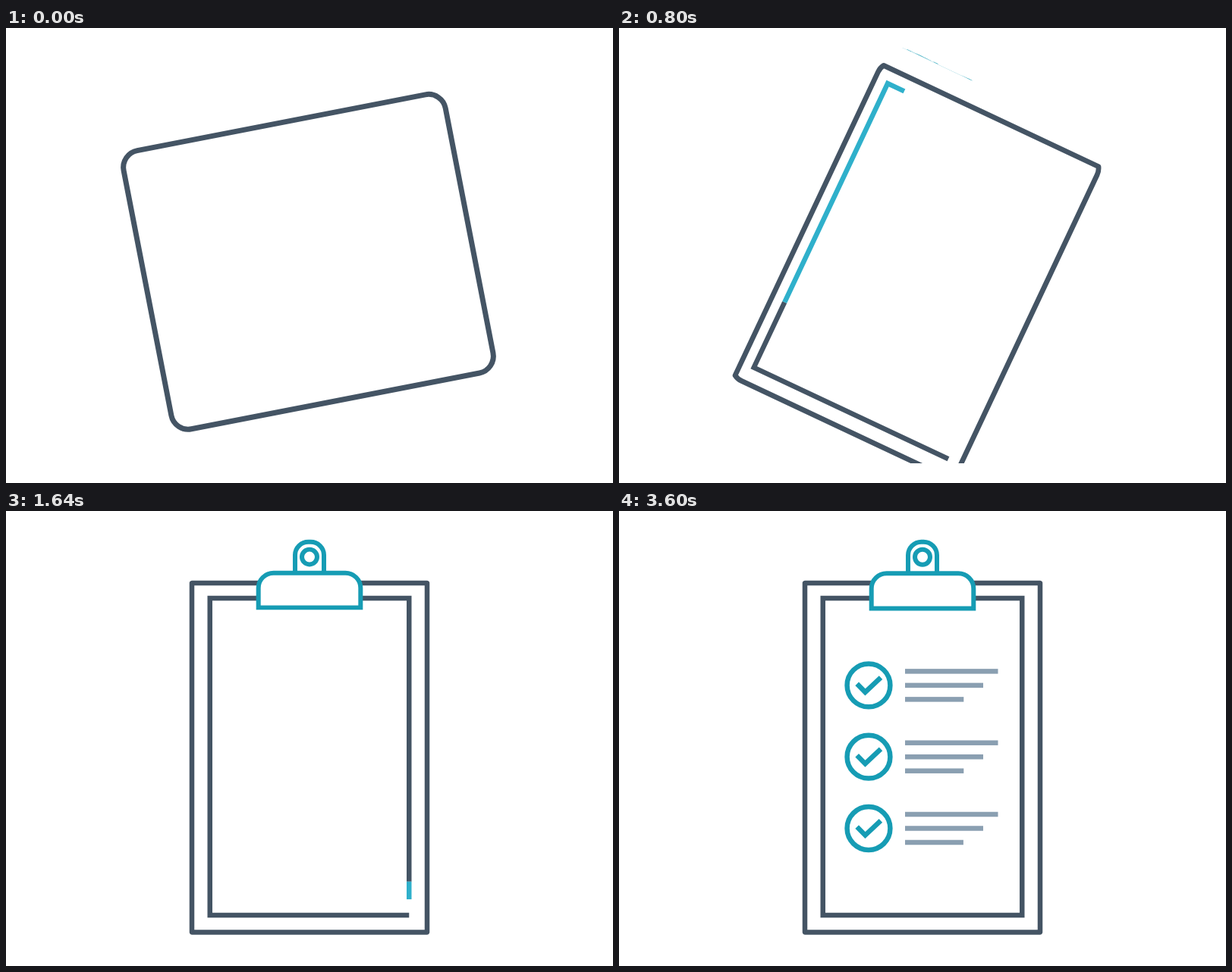
Animation of 800 by 600 pixels, one loop 3.64 s. Source, as an HTML page with a canvas:

```html
<!DOCTYPE html>
<html lang="en">
<head>
<meta charset="utf-8">
<title>Clipboard checklist</title>
<style>
  html, body { margin: 0; width: 100%; height: 100%; overflow: hidden; background: #fff; }
  canvas { display: block; }
</style>
</head>
<body>
<canvas id="stage" width="800" height="600"></canvas>
<script>
const ctx = document.getElementById('stage').getContext('2d');
const LOOP = 3640, STEP = 40, LINE = 6.5;
const DARK = '#445464', TEAL = '#169cb4', PEN = '#2fb0cb', GREY = '#8a9fb1';
const PIVOT = [400, 308];

// Cubic bezier easing whose handles are level at both ends.
function ease(x, a, b) {
  if (x <= 0) return 0;
  if (x >= 1) return 1;
  let lo = 0, hi = 1;
  for (let i = 0; i < 30; i++) {
    const s = (lo + hi) / 2, r = 1 - s;
    if (3 * s * r * r * a + 3 * s * s * r * b + s ** 3 < x) lo = s; else hi = s;
  }
  return lo * lo * (3 - 2 * lo);
}
const settle = (t, start, duration) => ease((t - start) / duration, 0.3, 0);

// Blends through values spaced 320 ms apart.
function morph(t, ...values) {
  const x = Math.min(t / 320, values.length - 1.0001), i = Math.floor(x);
  return values[i] + (values[i + 1] - values[i]) * (x - i);
}

function stroke(path, color, width = LINE) {
  ctx.strokeStyle = color;
  ctx.lineWidth = width;
  ctx.stroke(path);
}

function strokePart(path, length, from, to, color) {
  if (to <= from) return;
  ctx.setLineDash([0, from * length, (to - from) * length, length * 2]);
  stroke(path, color);
  ctx.setLineDash([]);
}

function drawFrame(t) {
  const half = morph(t, 187, 178, 164, 155);
  const top = -morph(t, 217.5, 214, 211.3, 213);
  const bottom = morph(t, 214.5, 214, 240.5, 247.5);
  const long = morph(t, 22.6, 21, 21.5, 0), longHandle = long * 0.55;
  const short = morph(t, 22.6, 21, 6, 0), shortHandle = morph(t, 12.5, 11.5, 0, 0);
  const path = new Path2D();

  // Each corner is cut further along one edge than along the other.
  function corner(x, y, alongXFirst) {
    const sx = Math.sign(x), sy = Math.sign(y);
    const [rx, hx, ry, hy] = y < 0
      ? [short, shortHandle, long, longHandle]
      : [long, longHandle, short, shortHandle];
    const points = [
      [x - sx * rx, y], [x - sx * (rx - hx), y],
      [x, y - sy * (ry - hy)], [x, y - sy * ry]
    ];
    if (!alongXFirst) points.reverse();
    path.lineTo(...points[0]);
    path.bezierCurveTo(...points.slice(1).flat());
  }
  corner(-half, top, false);
  corner(half, top, true);
  corner(half, bottom, false);
  corner(-half, bottom, true);
  path.closePath();
  ctx.lineJoin = 'round';
  stroke(path, DARK, morph(t, 7, 7, 7, LINE));
  ctx.lineJoin = 'miter';
}

function drawPaper(t) {
  const half = morph(t, 152, 152, 152, 131.25);
  const bottom = morph(t, 217, 217, 217, 225), top = -193;
  const length = 2 * (2 * half + bottom - top);
  const head = settle(t, 432, 1510), tail = settle(t, 533, 1540);
  const path = new Path2D();
  path.moveTo(half, bottom);
  path.lineTo(-half, bottom);
  path.lineTo(-half, top);
  path.lineTo(half, top);
  path.lineTo(half, bottom);
  if (tail >= 1) {
    path.closePath();
    stroke(path, DARK);
  } else {
    strokePart(path, length, 0, tail, DARK);
    strokePart(path, length, tail, head, PEN);
  }
}

function drawClip(t, angle) {
  const grow = settle(t, 745, 1085);
  if (grow <= 0) return;
  ctx.save();
  ctx.translate(400, 37.5);
  ctx.rotate(angle);
  ctx.scale(1.035 - 0.035 * settle(t, 1200, 500), grow);
  const knob = new Path2D();
  knob.moveTo(-19, 44);
  knob.lineTo(-19, 21);
  knob.arcTo(-19, 3.3, 0, 3.3, 17.5);
  knob.arcTo(19, 3.3, 19, 21, 17.5);
  knob.lineTo(19, 44);
  const ring = new Path2D();
  ring.arc(0, 23.3, 10, 0, 7);
  const base = new Path2D();
  base.roundRect(-67.3, 44.7, 134.6, 46.2, [20, 20, 0, 0]);
  ctx.fillStyle = '#fff';
  ctx.fill(knob);
  ctx.fill(base);
  stroke(knob, TEAL, 6);
  stroke(ring, TEAL, 6);
  stroke(base, TEAL, 6);
  ctx.restore();
}

function drawRow(t, y) {
  const part = start => settle(t, start, 1080);
  const circle = new Path2D();
  circle.arc(329, y, 28.4, Math.PI, 3 * Math.PI);
  strokePart(circle, 28.4 * 2 * Math.PI, 0, part(1639), TEAL);

  const check = new Path2D();
  check.moveTo(313.7, y - 2);
  check.lineTo(324.5, y + 9);
  check.lineTo(345, y - 10.3);
  strokePart(check, 43.6, 0, part(1929), TEAL);

  ctx.fillStyle = GREY;
  [[1679, 122.5], [1841, 103], [1946, 77.3]].forEach(([start, width], i) =>
    ctx.fillRect(377, y + (i - 1) * 18.5 - LINE / 2, width * part(start), LINE));
}

function draw(t) {
  const angle = 259 * Math.PI / 180 * (1 - ease(t / 1077, 0.594, 0.434));
  ctx.fillStyle = '#fff';
  ctx.fillRect(0, 0, 800, 600);
  ctx.save();
  ctx.beginPath();
  ctx.rect(0, 26, 800, 548);
  ctx.clip();

  ctx.save();
  ctx.translate(...PIVOT);
  ctx.rotate(angle);
  drawFrame(t);
  drawPaper(t);
  ctx.restore();

  drawClip(t, angle);
  for (let row = 0; row < 3; row++) drawRow(t - row * 353, 229.9 + row * 94.3);
  ctx.restore();
}

const began = performance.now();
function tick() {
  const t = (performance.now() - began) % LOOP;
  draw(Math.floor(t / STEP) * STEP);
  requestAnimationFrame(tick);
}
tick();
</script>
</body>
</html>
```
